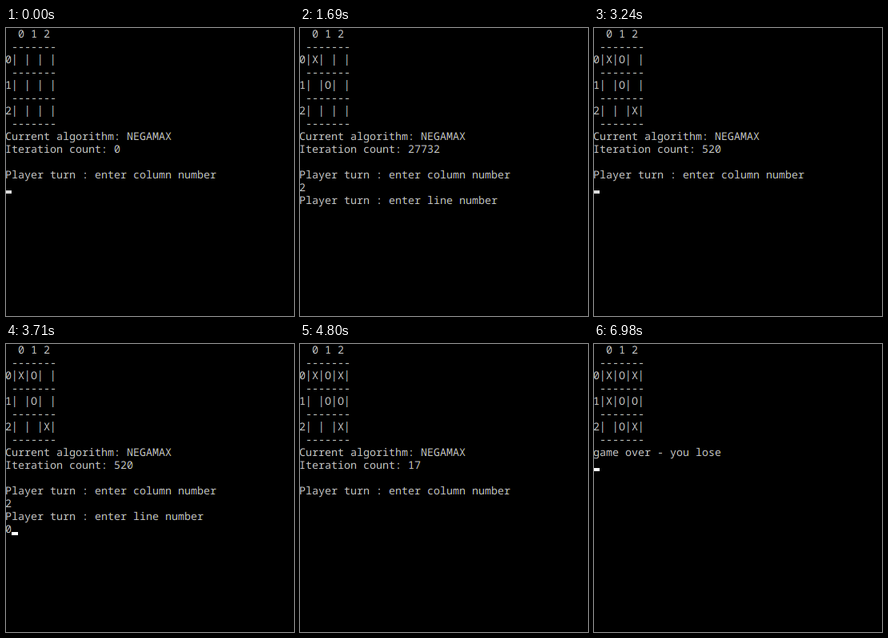
An HTML page with a canvas for the animation above (7.29 s loop, 360 px wide and 360 px high).

```html
<!DOCTYPE html>
<html lang="en">
<head>
<meta charset="utf-8">
<style>
  html, body { margin: 0; width: 100%; height: 100%; overflow: hidden; background: #000; }
  canvas { display: block; }
</style>
</head>
<body>
<canvas id="stage" width="360" height="360"></canvas>
<script>
const ctx = document.getElementById('stage').getContext('2d');
const LOOP = 7290, CELL_W = 8, CELL_H = 16;

// Game: squares in the order they are taken, X first.
const MOVES = [0, 4, 8, 1, 2, 5, 3, 7];
const LINES = ['012', '345', '678', '036', '147', '258', '048', '246'];

function cellsAfter(plies) {
  const cells = Array(9).fill(' ');
  MOVES.slice(0, plies).forEach((square, i) => cells[square] = 'XO'[i % 2]);
  return cells;
}

// Number of finished games the search reaches from a position.
function countEndings(cells, mark) {
  const other = mark === 'X' ? 'O' : 'X';
  const won = LINES.some(line => [...line].every(i => cells[i] === other));
  if (won || !cells.includes(' ')) return 1;
  let total = 0;
  for (let i = 0; i < 9; i++) {
    if (cells[i] !== ' ') continue;
    cells[i] = mark;
    total += countEndings(cells, other);
    cells[i] = ' ';
  }
  return total;
}

const iterations = [0, 1, 2, 3].map(turn =>
  turn ? countEndings(cellsAfter(turn * 2 - 1), 'O') : 0);

// Screens: lines of text and an optional cursor [column, row].
const screen = (lines, cursor) => ({ lines, cursor });

function board(plies) {
  const cells = cellsAfter(plies), rule = ' -------';
  const rows = [0, 1, 2].flatMap(r => [`${r}|${cells.slice(r * 3, r * 3 + 3).join('|')}|`, rule]);
  return ['  0 1 2', rule, ...rows];
}

const status = (plies, turn) =>
  [...board(plies), 'Current algorithm: NEGAMAX', `Iteration count: ${iterations[turn]}`, ''];

const blank = cursor => screen([], cursor);
const thinking = turn => screen(status(turn * 2 + 1, turn), [0, 10]);
const askColumn = (turn, lit = true) =>
  screen([...status(turn * 2, turn), 'Player turn : enter column number'], lit && [0, 12]);

function askLine(turn, typed = false, lit = true) {
  const square = MOVES[turn * 2], row = Math.floor(square / 3);
  const lines = [...askColumn(turn).lines, `${square % 3}`, 'Player turn : enter line number'];
  if (typed) lines.push(`${row}`);
  return screen(lines, lit && [typed ? 1 : 0, 14]);
}

const gameOver = (lit = true) =>
  screen([...board(8), 'game over - you lose'], lit && [0, 9]);

const timeline = [
  [0, askColumn(0)],
  [610, askLine(0)],
  [760, askLine(0, true)],
  [840, thinking(0)],
  [920, blank()],
  [990, askColumn(1)],
  [1690, askLine(1, false, false)],
  [1850, blank()],
  [1920, thinking(1)],
  [2000, askColumn(2)],
  [2710, askColumn(2, false)],
  [3240, askColumn(2)],
  [3560, askLine(2)],
  [3710, askLine(2, true)],
  [3800, thinking(2)],
  [3880, askColumn(3)],
  [4800, askColumn(3, false)],
  [5350, askColumn(3)],
  [5500, askLine(3)],
  [5670, askLine(3, true)],
  [5740, blank([1, 14])],
  [5820, gameOver()],
  [6450, gameOver(false)],
  [6980, gameOver()]
];

// One pass per colour channel, a third of a pixel apart, like LCD text.
const CHANNELS = [['#c80000', 1 / 3], ['#00c800', 0], ['#0000c8', -1 / 3]];

function drawLine(text, row, shift) {
  ctx.fillText(text.replaceAll('|', ' '), shift - 1, row * CELL_H + 12);
  [...text].forEach((char, col) => {
    if (char === '|') ctx.fillRect(col * CELL_W + 2.2 + shift, row * CELL_H + 1, 1, 14);
  });
}

function draw({ lines, cursor }) {
  ctx.globalCompositeOperation = 'source-over';
  ctx.fillStyle = '#000';
  ctx.fillRect(0, 0, 360, 360);
  ctx.globalCompositeOperation = 'lighter';
  ctx.font = '13.333px "Noto Sans Mono", monospace';
  ctx.textRendering = 'geometricPrecision';
  for (const [color, shift] of CHANNELS) {
    ctx.fillStyle = color;
    lines.forEach((text, row) => drawLine(text, row, shift));
  }
  if (cursor) {
    const [col, row] = cursor;
    ctx.fillStyle = row === 12 ? '#dcdcdc' : '#fff';
    ctx.fillRect(col * CELL_W - 1, row * CELL_H + 11, CELL_W, 4);
  }
}

let shown;
function tick() {
  const time = performance.now() % LOOP;
  const current = timeline.findLast(([start]) => start <= time)[1];
  if (current !== shown) draw(shown = current);
  requestAnimationFrame(tick);
}
tick();
</script>
</body>
</html>
```
